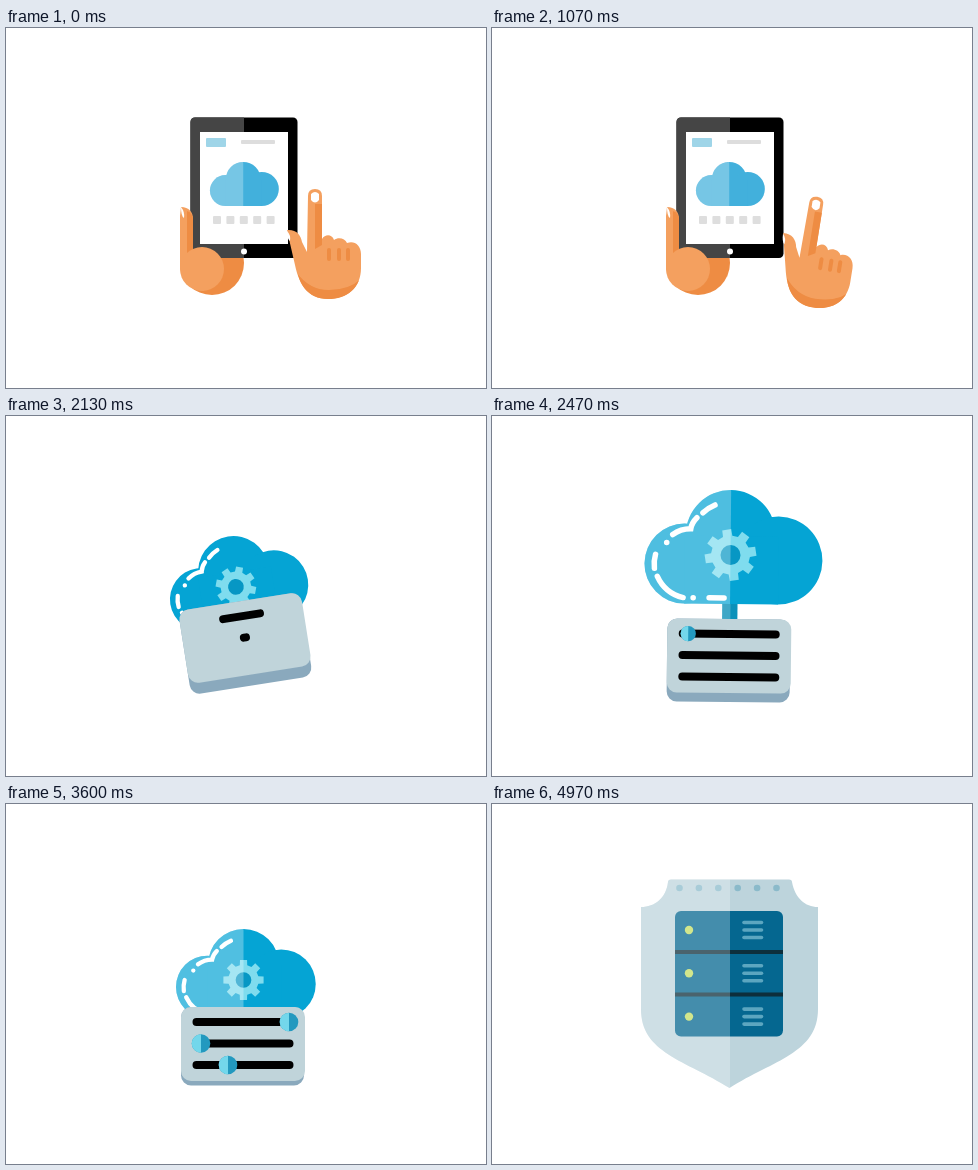
Recreate the animation shown at these times as an HTML page. Size 480 px wide and 360 px high, loop 5 s.

```html
<!DOCTYPE html>
<html lang="en">
<head>
<meta charset="utf-8">
<title>Cloud services</title>
<style>
html, body { margin: 0; width: 100%; height: 100%; overflow: hidden; background: #fff; }
svg { display: block; width: 100vw; height: 100vh; }
.light { fill: #f4a05f; }
.deep { fill: #ee8c43; }
.shine { fill: none; stroke: #fff; stroke-width: 5.5; stroke-linecap: round; }
</style>
</head>
<body>
<svg viewBox="0 0 480 360">
  <defs>
    <clipPath id="leftHalf"><path d="M0 0H238V360H0Z"/></clipPath>
    <clipPath id="palmClip"><path d="M290 230V215H355V240C355 260 341 271 322 271C302 271 290 256 290 230Z"/></clipPath>
    <g id="cloudShape">
      <circle cx="192" cy="148" r="40"/><circle cx="238" cy="119" r="45"/>
      <circle cx="286" cy="144" r="44"/><path d="M192 120H286V188H192Z"/>
    </g>
    <path id="shieldShape" d="M179 75.500H297Q300 75.500 300 78C303 94 313 103 326 103V205C326 249 282 256 237.500 284C193 256 149 249 149 205V103C163 103 174 94 176 78Q176 75.500 179 75.500Z"/>
  </defs>

  <g id="tabletScene">
    <g id="tablet">
      <circle class="deep" cx="206" cy="235" r="32"/>
      <rect x="184.500" y="89.500" width="107" height="140.500" rx="4.500"/>
      <path d="M238 89.500H189Q184.500 89.500 184.500 94V225.500Q184.500 230 189 230H238Z" fill="#454545"/>
      <path d="M194 104H282V216H194Z" fill="#fff"/>
      <rect x="200" y="110" width="20" height="9" rx="1" fill="#9fd5e8"/>
      <rect id="caption" x="235" y="112" width="34" height="4" rx="1" fill="#ddd"/>
      <g transform="translate(238 156) scale(.387) translate(-240 -131)">
        <use href="#cloudShape" fill="#42b0dc"/>
        <use href="#cloudShape" fill="#fff" opacity=".28" clip-path="url(#leftHalf)"/>
      </g>
      <g id="apps" fill="#dedede"></g>
      <circle cx="238" cy="223.500" r="3" fill="#fff"/>
      <path class="light" d="M175 179C183 179 187 184 187 191V230L198 263C183 261 174 252 174 235V188Z"/>
      <path class="deep" d="M181 183Q187 185 187 192V222L181 228Z"/>
      <path d="M175 179Q179 184 178 190Q175 188 175 179Z" fill="#fff"/>
      <circle class="light" cx="196" cy="241" r="22"/>
    </g>
    <g id="hand">
      <path class="light" d="M281 202C290 201 295 207 296 214L301 224L302 168Q302 161 309 161Q316 161 316 168V211C319 206 326 206 328 212C332 209 339 210 341 215C348 212 355 217 355 226V240C355 260 341 271 322 271C302 271 293 256 289 237L283 211Z"/>
      <path class="deep" clip-path="url(#palmClip)" d="M280 225Q295 262 323 262Q348 262 360 245V280H280Z"/>
      <path class="deep" d="M309 176H316V217L309 221Z"/>
      <path d="M305 166Q309 162 313 166V172Q309 177 305 172Z" fill="#fff"/>
      <path d="M281 203Q285 207 284 213Q281 211 281 203Z" fill="#fff"/>
      <path d="M323 222V231M333 222V231M342 222V231" stroke="#ee8c43" stroke-width="4" stroke-linecap="round"/>
    </g>
  </g>

  <g id="panelScene">
    <g id="stem">
      <path d="M230 0H245V101H230Z" fill="#0b91ba"/>
      <path d="M230 0H238V101H230Z" fill="#3fa7c6"/>
    </g>
    <g id="cloud">
      <use href="#cloudShape" fill="#05a4d4"/>
      <path id="gear" fill="#7fdcee"/>
      <circle cx="238" cy="139" r="10" fill="#0797c4"/>
      <use id="gloss" href="#cloudShape" fill="#fff" clip-path="url(#leftHalf)"/>
      <path class="shine" d="M222 89Q215 92 210 97M204 102Q199 107 198 113Q188 113 180 119M174 127h.1M163 139Q161 146 162 153M165 161Q173 178 191 182M201 182h.1M217 182H232"/>
    </g>
    <rect id="base" x="175" y="203" width="123" rx="10" fill="#8aa9bd"/>
    <rect x="175" y="203" width="124" height="74" rx="10" fill="#c0d4da"/>
    <g id="sliders"></g>
  </g>

  <g id="shieldScene">
    <use href="#shieldShape" fill="#bdd4dc"/>
    <g id="rivets" fill="#8bbaca"></g>
    <g id="rack">
      <rect x="183" y="107" width="108" height="125.500" rx="6" fill="#056790"/>
      <path d="M183 148H291M183 190.500H291" stroke="#0d2f3c" stroke-width="4"/>
    </g>
    <use id="shieldGloss" href="#shieldShape" fill="#fff" clip-path="url(#leftHalf)"/>
    <g id="lights"></g>
  </g>
</svg>
<script>
const LOOP = 5000;
const $ = id => document.getElementById(id);
const put = (id, transform) => $(id).setAttribute("transform", transform);
const about = (x, y, move) => `translate(${x} ${y}) ${move} translate(${-x} ${-y})`;
const show = (id, visible) => $(id).setAttribute("display", visible ? "inline" : "none");
const repeat = (count, draw) => Array.from({ length: count }, (_, i) => draw(i)).join("");

const progress = (t, from, to) => Math.max(0, Math.min(1, (t - from) / (to - from)));
const ease = (t, from, to) => {
  const p = progress(t, from, to);
  return p * p * (3 - 2 * p);
};
// Grows from 0 to 1 with a slight overshoot.
const pop = (t, from, to) => {
  const q = progress(t, from, to) - 1;
  return 1 + 2 * q ** 3 + q ** 2;
};

const sliders = [
  { start: 196, end: 283 },
  { start: 272, end: 195 },
  { start: 233, end: 222 }
];
const sliderY = i => 218 + 21.5 * i;
const serverY = i => 126 + 43.3 * i;

function gearPath(cx, cy) {
  const corner = (degrees, r) => {
    const a = degrees * Math.PI / 180;
    return `${cx + r * Math.sin(a)} ${cy - r * Math.cos(a)}`;
  };
  return `M${repeat(8, i => {
    const a = i * 45;
    return `L${corner(a - 14, 19.5)}L${corner(a - 10, 26)}L${corner(a + 10, 26)}L${corner(a + 14, 19.5)}`;
  }).slice(1)}Z`;
}

function build() {
  $("gear").setAttribute("d", gearPath(238, 139));
  $("apps").innerHTML = repeat(5, i =>
    `<rect x="${207 + 13.4 * i}" y="188" width="8" height="8" rx="1"/>`);
  $("sliders").innerHTML = repeat(3, i =>
    `<rect id="line${i}" y="${sliderY(i) - 4}" height="8" rx="4"/>
     <g id="knob${i}"><circle r="9.300" fill="#2399bf"/><path d="M0 -9.300A9.300 9.300 0 0 0 0 9.300Z" fill="#73d7eb"/></g>`);
  $("rivets").innerHTML = repeat(6, i => `<circle cx="${187.5 + 19.4 * i}" cy="84" r="3.300"/>`);
  $("lights").innerHTML = repeat(3, i =>
    `<circle id="led${i}" cx="197" cy="${serverY(i)}" r="4.200" fill="#d2e68c"/>
     <g id="vents${i}" stroke="#5ca6c0" stroke-width="3.600" stroke-linecap="round">${repeat(3, j =>
       `<path d="M252 ${serverY(i) + 7.5 * (j - 1)}H269.500"/>`)}</g>`);
}

function drawTablet(t) {
  const tilt = ease(t, 1380, 1670);
  const leave = progress(t, 1700, 1910) ** 2;
  put("tablet", `translate(${-2 * tilt - 260 * leave} ${300 * leave}) rotate(${26 * tilt - 60 * leave} 212 243)`);
  $("caption").setAttribute("width", 34 * (1 - ease(t, 1350, 1600)));

  // The hand swipes, leans back, swipes again and taps.
  const swipe = Math.max(0, Math.sin(2 * Math.PI * t / 1100)) ** 2;
  const lean = ease(t, 700, 1440);
  const tap = ease(t, 1400, 1670);
  const x = 323 + 13 * swipe + 8 * lean - 3 * tap - 40 * leave;
  const y = 238 + 2 * swipe + 18 * lean + 6 * tap + 200 * leave;
  const angle = 7 * swipe + 18 * lean - 36 * tap;
  put("hand", `translate(${x} ${y}) rotate(${angle}) scale(${1 - .22 * tap}) translate(-323 -238)`);
}

function drawPanel(t) {
  const age = (t - 1840) / 1000;
  const swing = -80 * Math.exp(-6 * age) * Math.cos(3 * age);
  const settle = ease(t, 2130, 2480);
  const scale = pop(t, 1840, 2080) * (1 - ease(t, 3610, 3740));
  put("panelScene", `translate(${239 - 2 * settle} ${222 + 18 * settle}) rotate(${swing}) scale(${scale}) translate(-237 -240)`);

  const close = ease(t, 3420, 3600);
  const open = settle - close;
  const bob = 20 * Math.sin(Math.PI * 2 * progress(t, 2870, 3590)) ** 2;
  const lift = 52 * ease(t, 1900, 2130) + 49 * open + 12 * close + bob;
  put("cloud", `translate(${236 + 1.5 * settle} ${240 - lift}) scale(${.785 + .215 * open}) translate(-238 -139)`);
  put("stem", `translate(0 ${240 - lift}) scale(1 ${lift / 101})`);
  put("gear", `rotate(${.048 * (t - 2870) + 10} 238 139)`);
  $("gloss").setAttribute("opacity", .3 * ease(t, 2180, 2500));
  $("base").setAttribute("height", 85 - 2 * settle - 4.5 * close);

  sliders.forEach(({ start, end }, i) => {
    const width = 101 * ease(t, 2010 + 70 * i, 2270 + 70 * i);
    $("line" + i).setAttribute("x", 237 - width / 2);
    $("line" + i).setAttribute("width", width);
    const x = start + (end - start) * ease(t, 2870, 3560);
    put("knob" + i, `translate(${x} ${sliderY(i)}) scale(${pop(t, 2390 + 80 * i, 2650 + 80 * i)})`);
  });
}

function drawShield(t) {
  put("shieldScene", about(237.5, 180, `scale(${ease(t, 3690, 3900)} ${pop(t, 3690, 4000)})`));
  put("rack", about(237, 170, `scale(${pop(t, 3880, 4180)})`));
  for (let i = 0; i < 3; i++) {
    const start = 4120 + 80 * i;
    put("led" + i, about(197, serverY(i), `scale(${pop(t, start, start + 260)})`));
    put("vents" + i, about(260, serverY(i), `scale(${ease(t, start + 60, start + 280)})`));
  }
  $("shieldGloss").setAttribute("opacity", .25 * ease(t, 4300, 4600));
}

function render(t) {
  show("tabletScene", t < 1910);
  show("panelScene", t >= 1840 && t < 3740);
  show("shieldScene", t >= 3690);
  drawTablet(t);
  drawPanel(t);
  drawShield(t);
}

function frame() {
  render(performance.now() % LOOP);
  requestAnimationFrame(frame);
}

build();
frame();
</script>
</body>
</html>
```
